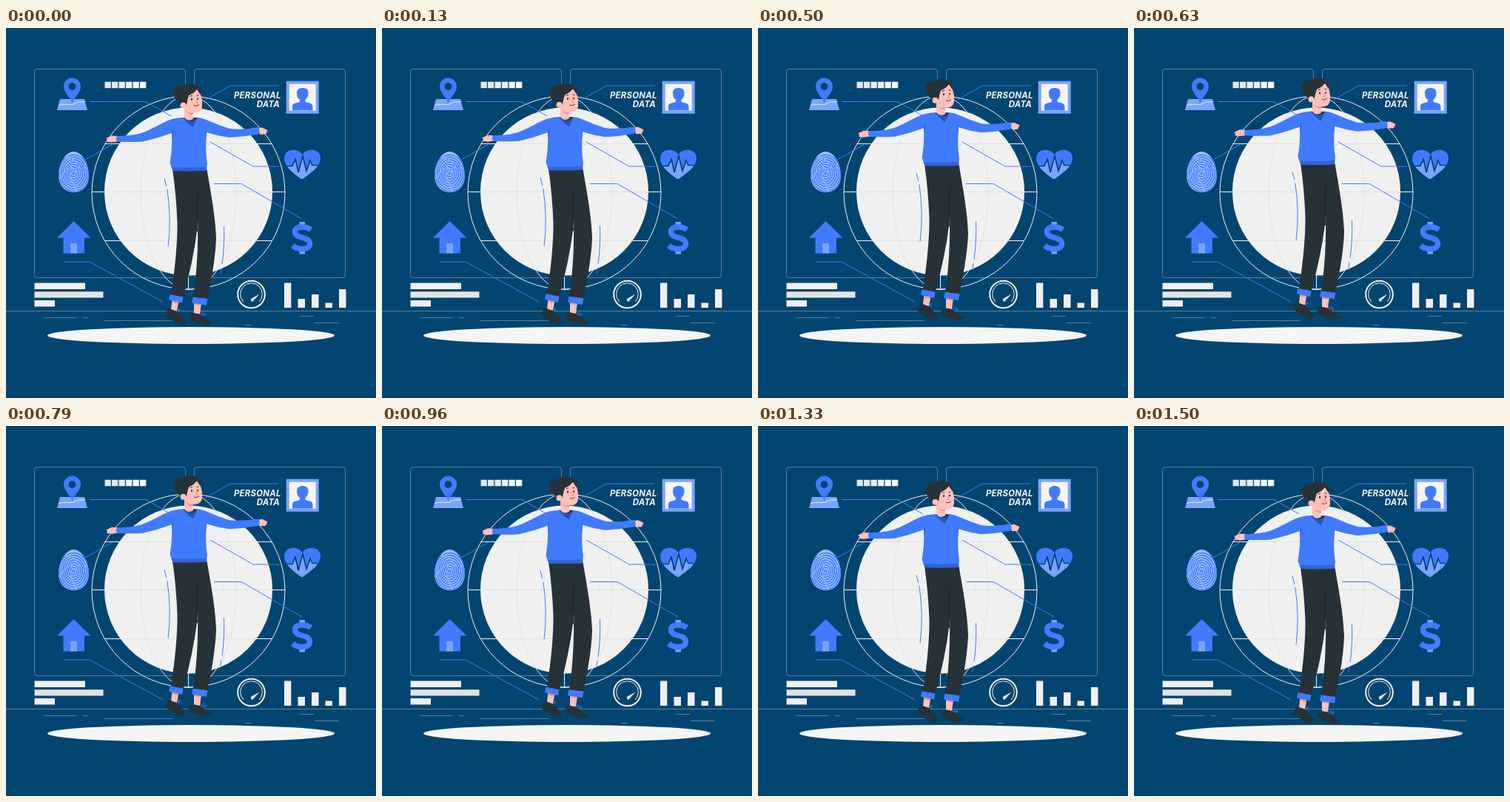
These frames come from a looping animation (500 by 500 pixels, 1540 ms). An HTML page:

```html
<!DOCTYPE html>
<html lang="en">
<head>
<meta charset="utf-8">
<title>Personal data</title>
<style>
  html, body { margin: 0; height: 100%; overflow: hidden; background: #024570; }
  svg { display: block; width: 100vw; height: 100vh; }
  .blue { fill: #407bff; }
  .pale { fill: #7ba3ff; }
  .white { fill: #f0f0f0; }
  .dark { fill: #263238; }
  .skin { fill: #ffc0b8; }
  .bg { fill: #024570; }
  .line { fill: none; stroke: #407bff; }
  .thin { fill: none; stroke: #f0f0f0; }
  .dim { fill: none; stroke: #fff; stroke-opacity: .32; }
  text { font: italic 700 11.4px Inter, "Open Sans", sans-serif; letter-spacing: .25px; fill: #f5f5f5; text-anchor: end; }
</style>
</head>
<body>
<svg viewBox="0 0 500 500">
  <defs>
    <clipPath id="disc"><circle cx="246.5" cy="221" r="113.5"/></clipPath>
    <path id="egg" d="M91.5 167C103 167 112 184 112 199C112 213 103 222 91.5 222S71 213 71 199C71 184 80 167 91.5 167Z"/>
    <path id="heart" d="M400 204.500C391 198 376 188 376 176C376 163 394 161 400.500 171C407 161 425 163 425 176C425 188 409 198 400 204.500Z"/>
    <clipPath id="eggClip"><use href="#egg"/></clipPath>
    <clipPath id="heartClip"><use href="#heart"/></clipPath>
    <g id="grid">
      <path d="M133.500 156.500H359.500M116 221.500H377M133.500 287.500H359.500M246.500 91V354"/>
      <ellipse cx="246.500" cy="222.500" rx="64.500" ry="131"/>
    </g>
  </defs>

  <g class="dim">
    <rect x="38.500" y="55.500" width="204" height="282" rx="4"/>
    <rect x="254.500" y="55.500" width="204" height="282" rx="4"/>
    <path d="M0 382.500H500M52 391.500H95M104 391.500H111M132 395.500H225M323 401.500H331M397 389.500H416M417 398.500H450"/>
  </g>
  <ellipse cx="250" cy="415.500" rx="194" ry="11.500" fill="#f5f5f5"/>

  <!-- Globe -->
  <g class="thin">
    <circle cx="246.500" cy="222.500" r="130.500"/>
    <use href="#grid"/>
  </g>
  <circle class="white" cx="246.500" cy="221" r="113.500"/>
  <g clip-path="url(#disc)" fill="none" stroke="#dfe1e2">
    <use href="#grid"/>
    <path d="M133 221.500H360" stroke-width="5" stroke-dasharray="1 15"/>
  </g>

  <!-- Connectors -->
  <path class="line" d="M113 99.500H189L223 119M270 97L303 78H369M108 177.500L143 157.500M276 154L334 187H370M281 210.500H318L400 258M78 316H113L212 370"/>

  <!-- Map pin -->
  <path class="pale" d="M73 96H106L110 111H69Z"/>
  <path class="thin" d="M71 105C80 101 85 106 93 102S102 101 107 99.500"/>
  <path class="blue" d="M89.500 67.500A11.500 11.500 0 0 1 101 79C101 87 93 92 89.700 102C86 92 78 87 78 79A11.500 11.500 0 0 1 89.500 67.500Z"/>
  <circle class="bg" cx="89.500" cy="79" r="5"/>
  <g id="squares"></g>

  <!-- Fingerprint -->
  <use href="#egg" fill="#9dbcff"/>
  <g id="ridges" class="line" clip-path="url(#eggClip)" stroke-width="1.500"></g>

  <!-- House -->
  <path class="blue" d="M91.500 261L114.500 283.500H106V304.500H77.500V283.500H69Z"/>
  <path class="pale" d="M87 291H96V304.500H87Z"/>

  <!-- Portrait -->
  <text x="371.700" y="94.500">PERSONAL</text>
  <text x="370" y="107">DATA</text>
  <rect x="380.700" y="73.700" width="40" height="40" fill="#f5f5f5" stroke="#7ba3ff" stroke-width="4"/>
  <path class="blue" d="M387 111.500V106C387 102 391 101.500 397 100V97C394 95 393 92 393 88C393 83 396 81 401 81S408.500 83 408.500 88C408.500 92 407 95 404.500 97V100C411 101.500 414.500 102 414.500 106V111.500Z"/>

  <!-- Heartbeat -->
  <g clip-path="url(#heartClip)">
    <path class="blue" d="M375 160H426V206H375Z"/>
    <path class="pale" d="M375 187H387L391 179L395 195L401 174L406 194L411 181L414 186H426V206H375Z"/>
    <path d="M375 186.500H387L391 177L395 195L401 173L406 193L411 179L414 185.500H426" fill="none" stroke="#024570" stroke-width="1.700"/>
  </g>

  <!-- Dollar -->
  <path class="pale" d="M396.500 262H404V270H396.500ZM396.500 298H404V305.500H396.500Z"/>
  <path class="line" stroke-width="7.500" d="M412 272.500C407 268.500 390.500 266.500 390.500 275C390.500 286 410.500 280.500 410.500 291.500C410.500 301.500 393 299.500 387.500 294"/>

  <!-- Charts -->
  <path class="white" d="M38.500 344.500H107V353H38.500ZM38.500 368H66V376.500H38.500ZM376 344.500H385.300V378H376ZM394.500 366H404V378H394.500ZM413 360H422.500V378H413ZM431.500 371.500H441V378H431.500ZM450 353H459.500V378H450Z"/>
  <path fill="#e2e4e4" d="M38.500 356.300H131.500V364.600H38.500Z"/>
  <circle class="thin" cx="331.500" cy="360" r="18.300" stroke-width="2"/>
  <path class="thin" d="M321 370A14.800 14.800 0 1 1 342 370"/>
  <path class="white" d="M331 366L342.500 359.500L333.500 369.500Q331 370.500 331 366Z"/>

  <g id="person">
    <path class="line" d="M214 203L216.800 213.500M217.800 218Q224 258 219 295.500M294.500 268Q295.500 296 292 319M291 325L290 333"/>

    <!-- Feet -->
    <path class="skin" d="M224.500 367L233.500 369L231 383L223 380ZM254 370L264 371L262 387L254 385Z"/>
    <path fill="#e99a92" d="M224.500 368L233.500 370L233 373L224 371ZM254 371L264 372V375L254 374Z"/>
    <path class="dark" d="M220 377.500Q225 382 231 382.500Q236 389 242 394.500Q244.500 400 237 402Q226 397 215 388.500ZM249 385.500Q255 386 262 386.500Q269 392 277 397.500Q279 402 271 402Q260 401 246.500 393Z"/>
    <path class="line" d="M231 382L235 379L233 384M262 387L268 384M264 388.500L270 386.500L268 390"/>

    <!-- Trousers -->
    <path class="dark" d="M225 191H262Q261 238 258 274Q253 315 239.500 364L223 360.500Q232 300 231.500 263Q230 225 225 191Z"/>
    <path class="dark" d="M245 191H271.500C275 213 283 252 284 284Q283 315 272 367L253 364Q262 303 258 234Z"/>
    <path d="M260 221Q256 238 258.500 275" fill="none" stroke="#172126"/>
    <path class="blue" d="M221.500 360L239.500 363.500L238 371.500L220 367.500ZM252.500 363.500L272.500 366L271 374.500L251 371.500Z"/>

    <!-- Hands -->
    <path class="skin" d="M150 146L143 145.500L135.500 149L137 151.500L136 153.500L143 154.500L150 153.500ZM341 135.500L346 134.500L353.500 138L351 143.500L343 144Z"/>

    <!-- Sweater -->
    <path class="blue" d="M240 121Q229 121 219 125C204 132 194 138 183 142Q169 146 150 146Q148 149 150 153.500Q170 154.500 185 153.500Q205 149 224 142Q225 163 221.500 182L225 192.500H271L272 183Q269 166 271 141Q286 146 302 148Q322 147 341 143.500Q344 139 341 134Q320 138 302 136Q286 131 273 125Q264 121 257 121Z"/>
    <path fill="#3264d4" d="M224.500 188Q248 189 271 187.500L271 192.500Q248 194 225.500 193ZM224 142L226.500 134L225 152ZM271 142L270 134L270 153Z"/>
    <path fill="#2a55b5" d="M238.500 121H259L252.500 134Q245 129 238.500 121Z"/>
    <path class="dark" d="M240 121.500L258 122L252 126Z"/>

    <!-- Head -->
    <path class="skin" d="M241 104V121Q246 127 253 123L252 112Z"/>
    <path fill="#e99a92" d="M243 112Q248 116 253 114V117Q247 118 243 112Z"/>
    <path class="skin" d="M244 88Q254 80 261 84Q266 96 265 106Q264 114 256 114.500Q247 115 243 109Z"/>
    <path class="dark" d="M240 105C231 102 226 95 227 85C229 78 236 80 240 77C248 74 258 76 262 81Q265 86 262.500 90Q260 86 258 83Q253 89 247 91Q245 97 244 103Z"/>
    <ellipse class="skin" cx="239.500" cy="104.500" rx="3.900" ry="4"/>
    <path class="dark" d="M250 95H252V97.500H250ZM258.300 94.500H260V97H258.300Z"/>
    <path d="M248.500 92.500L252 91M257.500 91L260.500 91M254 105Q258 106.500 261 103.500" fill="none" stroke="#263238" stroke-width=".9"/>
    <path d="M256.500 97L258.500 101H256" fill="none" stroke="#e58b84" stroke-width=".9"/>
  </g>
</svg>
<script>
  const LOOP = 1540, STEPS = 37, RISE = 8.9, LEAD = 25;
  const person = document.getElementById('person');

  document.getElementById('squares').innerHTML = Array.from({ length: 6 }, (_, i) =>
    `<rect x="${133.500 + i * 9.500}" y="72.700" width="8.300" height="8.500" fill="hsl(0 0% ${90 + i * 1.500}%)"/>`).join('');

  document.getElementById('ridges').innerHTML = Array.from({ length: 8 }, (_, i) => {
    const r = 1.500 + i * 2.600;
    return `<ellipse cx="91.500" cy="196" rx="${r}" ry="${r * 1.250}" stroke-dasharray="${9 + i * 3} 1.500"/>`;
  }).join('');

  function draw() {
    const step = Math.floor(performance.now() % LOOP / LOOP * STEPS);
    const phase = step / STEPS + LEAD / LOOP;
    const lift = RISE * (1 - Math.cos(2 * Math.PI * phase)) / 2;
    person.setAttribute('transform', `translate(0 ${-lift})`);
    requestAnimationFrame(draw);
  }
  draw();
</script>
</body>
</html>
```
